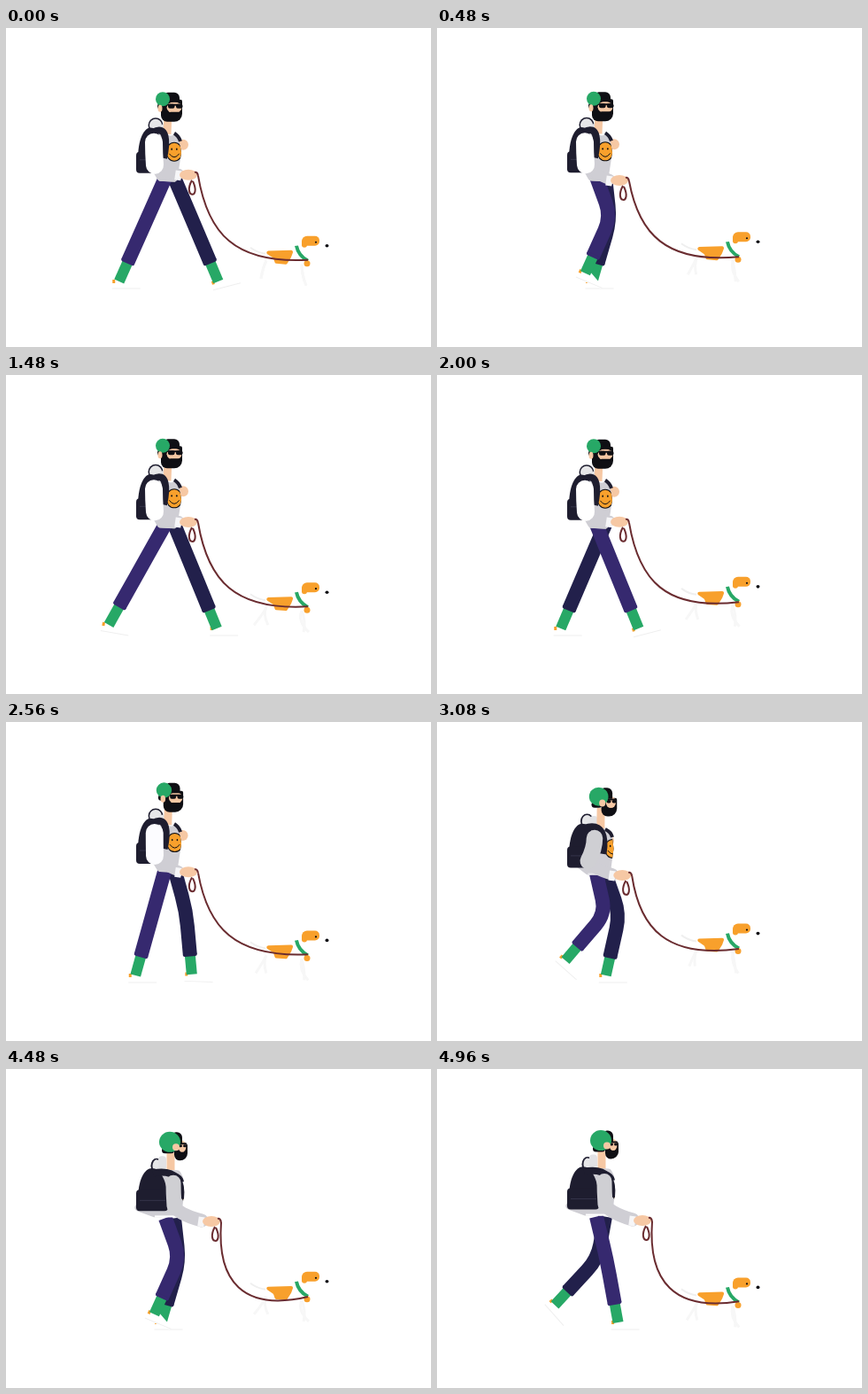
Recreate the animation shown at these times as an HTML page with a canvas. Size 480 px wide and 360 px high, loop 5 s.

```html
<!DOCTYPE html>
<html lang="en">
<head>
<meta charset="utf-8">
<title>Walking the dog</title>
<style>
html, body { margin: 0; width: 100%; height: 100%; overflow: hidden; background: #fff; }
canvas { display: block; }
</style>
</head>
<body>
<canvas id="stage" width="480" height="360"></canvas>
<script>
const ctx = document.getElementById('stage').getContext('2d');
const LOOP = 5000, TICK = 40, STRIDE = 4000 / 3, TROT = 1200;
const THIGH = 50, SHIN = 72, SWING = .41, GROUND = 286;
const INK = '#1e1d2f', BLACK = '#0f0f14', SKIN = '#f6c8a4', GREEN = '#27a866', ORANGE = '#f8a02c',
  SHIRT = '#cfced4', NEAR = '#36296f', FAR = '#22204b', LEASH = '#6a2c30', FAINT = '#efefef';

const frac = x => x - Math.floor(x);
const mix = (a, b, k) => a + (b - a) * k;
const between = (p, q, k) => [mix(p[0], q[0], k), mix(p[1], q[1], k)];
const clamp = x => Math.min(1, Math.max(0, x));
const wave = x => Math.cos(2 * Math.PI * x);
const easeInOut = x => (1 - Math.cos(Math.PI * clamp(x))) / 2;
// Smooth bump inside a stretch of the cycle
const pulse = (p, start, length) => Math.sin(Math.PI * clamp(frac(p - start) / length)) ** 2;
const gray = v => `rgb(${v},${v},${Math.min(255, v + 4)})`;

function fill(color) {
  ctx.fillStyle = color;
  ctx.fill();
}

function oval(color, x, y, rx, ry = rx) {
  ctx.beginPath();
  ctx.ellipse(x, y, Math.max(0, rx), ry, 0, 0, 7);
  fill(color);
}

function box(color, x, y, w, h, r) {
  ctx.beginPath();
  ctx.roundRect(x, y, w, h, r);
  fill(color);
}

// Closed shape with rounded corners
function shape(color, pts, r) {
  ctx.beginPath();
  ctx.moveTo(...between(pts.at(-1), pts[0], .5));
  pts.forEach((p, i) => ctx.arcTo(...p, ...pts[(i + 1) % pts.length], r));
  ctx.closePath();
  fill(color);
}

// Straight, quadratic or cubic stroke, depending on the number of points
function line(color, width, pts, cap = 'butt') {
  const method = { 2: 'lineTo', 3: 'quadraticCurveTo', 4: 'bezierCurveTo' }[pts.length];
  ctx.beginPath();
  ctx.moveTo(...pts[0]);
  ctx[method](...pts.slice(1).flat());
  ctx.strokeStyle = color;
  ctx.lineWidth = width;
  ctx.lineCap = cap;
  ctx.stroke();
}

// Phase 0 is the moment the foot is furthest back
function footAt(p) {
  const travel = p < SWING ? easeInOut((p / SWING) ** 1.4) : 1 - easeInOut((p - SWING) / (1 - SWING));
  const lift = pulse(p, .93, .4);
  return { x: mix(122, 237, travel), y: GROUND - 21 * lift, tilt: .9 * lift - .25 * pulse(p, .28, .2) };
}

function kneeAt(hip, ankle) {
  const dx = ankle[0] - hip[0], dy = ankle[1] - hip[1], d = Math.hypot(dx, dy);
  const along = Math.min(THIGH, (d * d + THIGH ** 2 - SHIN ** 2) / (2 * d));
  const out = .8 * Math.sqrt(THIGH ** 2 - along ** 2);
  return [hip[0] + (dx * along + dy * out) / d, hip[1] + (dy * along - dx * out) / d];
}

function leg(color, phase, shift, hip) {
  const foot = footAt(phase), ankle = [foot.x + shift, foot.y];
  const knee = kneeAt(hip, ankle), cuff = between(knee, ankle, .69);
  ctx.save();
  ctx.translate(...ankle);
  ctx.rotate(foot.tilt);
  shape('#fff', [[-7, -2], [6, -3], [24, 6], [24, 9], [-8, 9]], 3);
  line(FAINT, 1, [[-8, 8], [24, 8]]);
  line(ORANGE, 3, [[-6, -2], [-6, 2]]);
  ctx.restore();
  line(GREEN, 12, [cuff, ankle]);

  ctx.beginPath();
  ctx.moveTo(...hip);
  ctx.lineTo(...between(knee, hip, .35));
  ctx.quadraticCurveTo(...knee, ...between(knee, cuff, .35));
  ctx.lineTo(...cuff);
  ctx.strokeStyle = color;
  ctx.lineWidth = 16;
  ctx.stroke();
  const a = Math.atan2(cuff[1] - knee[1], cuff[0] - knee[0]) + Math.PI / 2;
  const side = s => [cuff[0] + s * Math.cos(a), cuff[1] + s * Math.sin(a)];
  line(color, 4, [side(-6), side(6)], 'round');
}

function head(turn) {
  const at = (a, b) => mix(a, b, Math.sqrt(turn));
  line(SKIN, 9, [[at(183, 186), 94], [at(182, 186), 119]]);
  box(BLACK, at(175, 190), at(80, 84), at(24, 15), at(25, 19), [2, 2, 9, 7]);
  oval(SKIN, at(190, 199), at(89, 87), at(8.5, 4.5), 6.5);
  box(BLACK, at(185, 194), 94, at(12, 8), 3, 1);
  box(BLACK, at(180, 189), at(72, 71), at(16, 10), at(11, 13), [3, 6, 1, 1]);
  box(BLACK, at(182, 194), at(85, 83), at(17, 10), 2, 1);
  for (const lens of [0, 1]) box(BLACK, at(183 + lens * 9, 195 + lens * 5), 85, at(7.5, 4), at(5, 3), 2);
  box(BLACK, at(171, 176), at(84, 88), at(7, 14), 7, 4);
  oval(GREEN, at(177, 185), at(79.5, 82), at(8, 12), at(8, 11.5));
  oval(SKIN, at(174, 192), at(90, 88), at(2.5, 4), 4);
}

function smiley(x, y, rx, ry) {
  oval(BLACK, x, y, rx, ry);
  oval(ORANGE, x, y, rx - 1, ry - 1);
  for (const side of [-.3, .3]) oval(BLACK, x + side * rx, y - 3, .8, 1.2);
  line(BLACK, 1, [[x - rx * .6, y + 2], [x, y + 10], [x + rx * .6, y + 2]]);
}

// turn: 0 shows the chest, 1 shows the back
function body(turn, reach, bob, tip) {
  const at = (a, b) => mix(a, b, turn);
  ctx.save();
  ctx.translate(0, bob);

  oval(INK, at(169, 170), 109, at(8.5, 6.5), 8.5);
  oval('#e6e6e8', at(169, 170), 109, at(7, 4.5), 7);
  box('#e2e2e5', at(173, 172), at(108, 98), 9, 16, 4);
  head(turn);

  oval(SKIN, at(200, 188), 131, 6);
  shape(SHIRT, [
    [at(174, 176), at(119, 113)], [at(187, 196), at(121, 114)], [at(194, 200), at(117, 122)],
    [at(198, 201), 140], [at(193, 198), at(173, 167)], [at(172, 167), at(172, 167)], [at(163, 143), at(156, 158)]
  ], 4);
  ctx.save();
  ctx.clip();
  smiley(at(190, 207), at(139, 141), 9.5, 11);
  ctx.restore();
  line(gray(at(207, 255)), 2, [[at(173, 168), at(171, 166)], [at(191, 198), at(172, 166)]]);
  line(INK, 4, [[190, 118], [at(195, 198), 121], [at(197, 199), 127]]);

  // Backpack, pocket and shoulder strap
  ctx.beginPath();
  ctx.moveTo(149, 150);
  ctx.bezierCurveTo(148, 98, at(180, 182), 100, at(176, 183), 150);
  fill(INK);
  line(INK, 8, [[166, 117], [at(182, 194), at(108, 112)], [at(182, 199), 128], [at(178, 197), 146]]);
  box(INK, 147, at(139, 136), at(20, 36), 24, 4);
  line('#34344a', 1, [[151, 148], [at(163, 180), 148]]);

  // Near arm, from shoulder to cuff
  const shoulder = at(167, 189), bend = [mix(168, 190, reach), 154];
  const wrist = [tip[0] - 21, tip[1] - bob - 2];
  line(SHIRT, mix(12, 15, turn), [bend, [mix(174, 193, reach), 163], wrist], 'round');
  line(gray(Math.round(mix(255, 207, clamp(turn * 2)))), at(20, 17),
    [[shoulder, 128], [shoulder, 140], bend], 'round');
  ctx.restore();

  line('#f6f6f8', 11, [[tip[0] - 25, tip[1] - 1], [tip[0] - 18, tip[1]]]);
  oval(SKIN, tip[0] - 10, tip[1] - 1, 10, 6);
}

function dog(t, dy) {
  const swing = Math.sin(2 * Math.PI * t / TROT);
  ctx.save();
  ctx.translate(0, dy);
  line(FAINT, 2, [[293, 250], [284, 249], [276, 243]]);
  for (const side of [-1, 1]) {
    line('#f7f7f7', 3, [[294, 258], [290, 266], [288 + side * swing * 8, 278]]);
    line('#f7f7f7', 3, [[334, 262], [334 + side * swing * 5, 274], [339 - side * swing * 3, 286]]);
  }
  shape(ORANGE, [[290, 247], [325, 246], [322, 254], [317, 262], [304, 261], [302, 255]], 2);
  box(ORANGE, 334, 230, 20, 11, [6, 5, 5, 1]);
  box(ORANGE, 334, 234, 6, 9, 3);
  oval(BLACK, 350, 237, 1.1);
  oval(BLACK, 362.5, 241, 2, 1.8);
  line(GREEN, 4, [[328, 241], [330, 252], [341, 258]]);
  oval(ORANGE, 340, 261, 3.5);
  ctx.restore();
}

function leash([x, y], reach, endY) {
  line(LEASH, 2, [[x - 3, y - 4], [x, y - 5], [x + 1, y]]);
  line(LEASH, 2, [[x + 1, y], [mix(228, 238, reach), mix(232, 240, reach)],
    [mix(258, 268, reach), mix(266, 274, reach)], [341, endY]]);
  line(LEASH, 2, [[x - 6, y + 5], [x - 17, y + 25], [x + 5, y + 27], [x - 5, y + 6]]);
}

function draw(t) {
  const nearPhase = frac((t - 163) / STRIDE), farPhase = frac(nearPhase + .5);
  const step = frac(nearPhase * 2);
  const bob = 3 * wave(2 * (step - .36));
  const turn = easeInOut((t - 2400) / 1360), reach = turn ** 3;
  const tip = [mix(216, 242, reach), 170 + 4 * wave(step - .36)];
  const trot = 1.5 + 4 * wave(t / TROT - .1);

  ctx.fillStyle = '#fff';
  ctx.fillRect(0, 0, 480, 360);
  leg(FAR, farPhase, 6, [190, 168 + bob]);
  leg(NEAR, nearPhase, -6, [180, 168 + bob]);
  body(turn, reach, bob, tip);
  dog(t, trot);
  leash(tip, reach, 258 + trot * .8);
}

function tick() {
  draw(Math.floor(performance.now() % LOOP / TICK) * TICK);
  requestAnimationFrame(tick);
}
tick();
</script>
</body>
</html>
```
